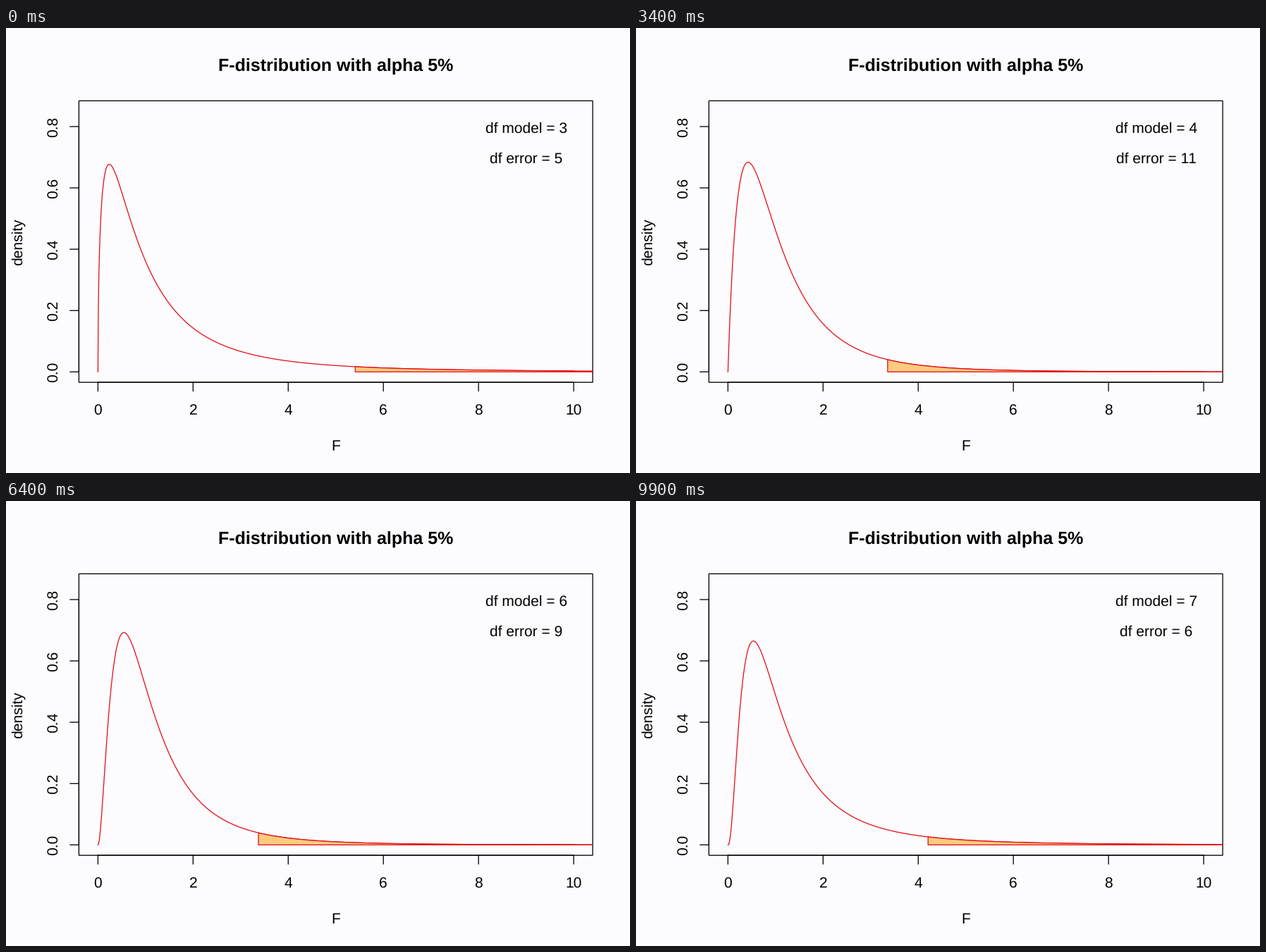
Write a matplotlib script that moves like this. It is 885 px wide and 632 px high and loops after 10 s.

```python
import math

import matplotlib.pyplot as plt
import numpy as np
from matplotlib.animation import FuncAnimation
from matplotlib.patches import Polygon, Rectangle

W, H, DPI = 885, 632, 100
LEFT, RIGHT, TOP, BOTTOM = 103.4, 832.1, 103.4, 503.2
X_LIM = (-0.4, 10.4)
Y_LIM = (-0.034, 0.884)
BG, RED, ORANGE = "#fcfcfe", "#e3121a", "#fdcb7e"
ALPHA = 0.05
PT = 72 / DPI
LINE = 1.3 * PT
TICK = 12.6

plt.rcParams.update({
    "font.family": "Liberation Sans",
    "text.hinting": "none",
    "text.hinting_factor": 1,
})


def f_pdf(x, d1, d2):
    log_beta = math.lgamma(d1 / 2) + math.lgamma(d2 / 2) - math.lgamma((d1 + d2) / 2)
    scale = math.exp(-log_beta) * (d1 / d2) ** (d1 / 2)
    return scale * x ** (d1 / 2 - 1) * (1 + d1 * x / d2) ** (-(d1 + d2) / 2)


def f_quantile(p, d1, d2):
    # the F variable is a transformed beta variable w
    w = np.linspace(0, 1, 20001)
    pdf = w ** (d1 / 2 - 1) * (1 - w) ** (d2 / 2 - 1)
    cdf = np.concatenate(([0], np.cumsum(pdf[1:] + pdf[:-1])))
    q = np.interp(p, cdf / cdf[-1], w)
    return d2 * q / (d1 * (1 - q))


def px(x):
    return LEFT + (x - X_LIM[0]) / (X_LIM[1] - X_LIM[0]) * (RIGHT - LEFT)


def py(y):
    return BOTTOM - (y - Y_LIM[0]) / (Y_LIM[1] - Y_LIM[0]) * (BOTTOM - TOP)


fig = plt.figure(figsize=(W / DPI, H / DPI), dpi=DPI, facecolor=BG)
stage = fig.add_axes([0, 0, 1, 1])
stage.set(xlim=(0, W), ylim=(H, 0))
stage.axis("off")


def label(x, y, text, size=21, **kw):
    return stage.text(x, y, text, fontsize=size * PT, ha="center",
                      va="baseline", rotation_mode="anchor", **kw)


def segment(xs, ys):
    stage.plot(xs, ys, color="black", lw=LINE, snap=False, solid_capstyle="round")


mid_x, mid_y = (LEFT + RIGHT) / 2, (TOP + BOTTOM) / 2
stage.add_patch(Rectangle((LEFT, TOP), RIGHT - LEFT, BOTTOM - TOP, fill=False,
                          ec="black", lw=LINE, snap=False))
segment([px(0), px(10)], [BOTTOM, BOTTOM])
segment([LEFT, LEFT], [py(0), py(0.8)])
for v in range(0, 11, 2):
    segment([px(v)] * 2, [BOTTOM, BOTTOM + TICK])
    label(px(v), 549, str(v))
for v in np.arange(5) * 0.2:
    segment([LEFT - TICK, LEFT], [py(v)] * 2)
    label(73, py(v), f"{v:.1f}", rotation=90)

label(mid_x, 61, "F-distribution with alpha 5%", 25.2, weight="bold")
label(mid_x, 600, "F")
label(23, mid_y, "density", rotation=90)
model_text = label(px(9), 149, "")
error_text = label(px(9), 192, "")

plot = fig.add_axes([LEFT / W, 1 - BOTTOM / H, (RIGHT - LEFT) / W, (BOTTOM - TOP) / H])
plot.set(xlim=X_LIM, ylim=Y_LIM)
plot.axis("off")
xs = np.linspace(0, 10, 1001)
curve, = plot.plot([], [], color=RED, lw=LINE, snap=False, solid_joinstyle="round")
tail = Polygon([(0, 0), (1, 0), (1, 1)], fc=ORANGE, ec=RED, lw=LINE,
               snap=False, joinstyle="round", zorder=3)
plot.add_patch(tail)


def update(i):
    # error df climbs 5..15 and falls back for every model df
    d1 = 3 + i // 20
    d2 = 15 - abs(10 - i % 20)
    curve.set_data(xs, f_pdf(xs, d1, d2))
    q = f_quantile(1 - ALPHA, d1, d2)
    tx = np.linspace(q, 12, 400)
    top = np.column_stack([tx, f_pdf(tx, d1, d2)])
    tail.set_xy(np.vstack([[q, 0], top, [12, 0]]))
    model_text.set_text(f"df model = {d1}")
    error_text.set_text(f"df error = {d2}")
    return curve, tail, model_text, error_text


anim = FuncAnimation(fig, update, frames=100, interval=100, repeat=True, repeat_delay=0)
plt.show()
```
